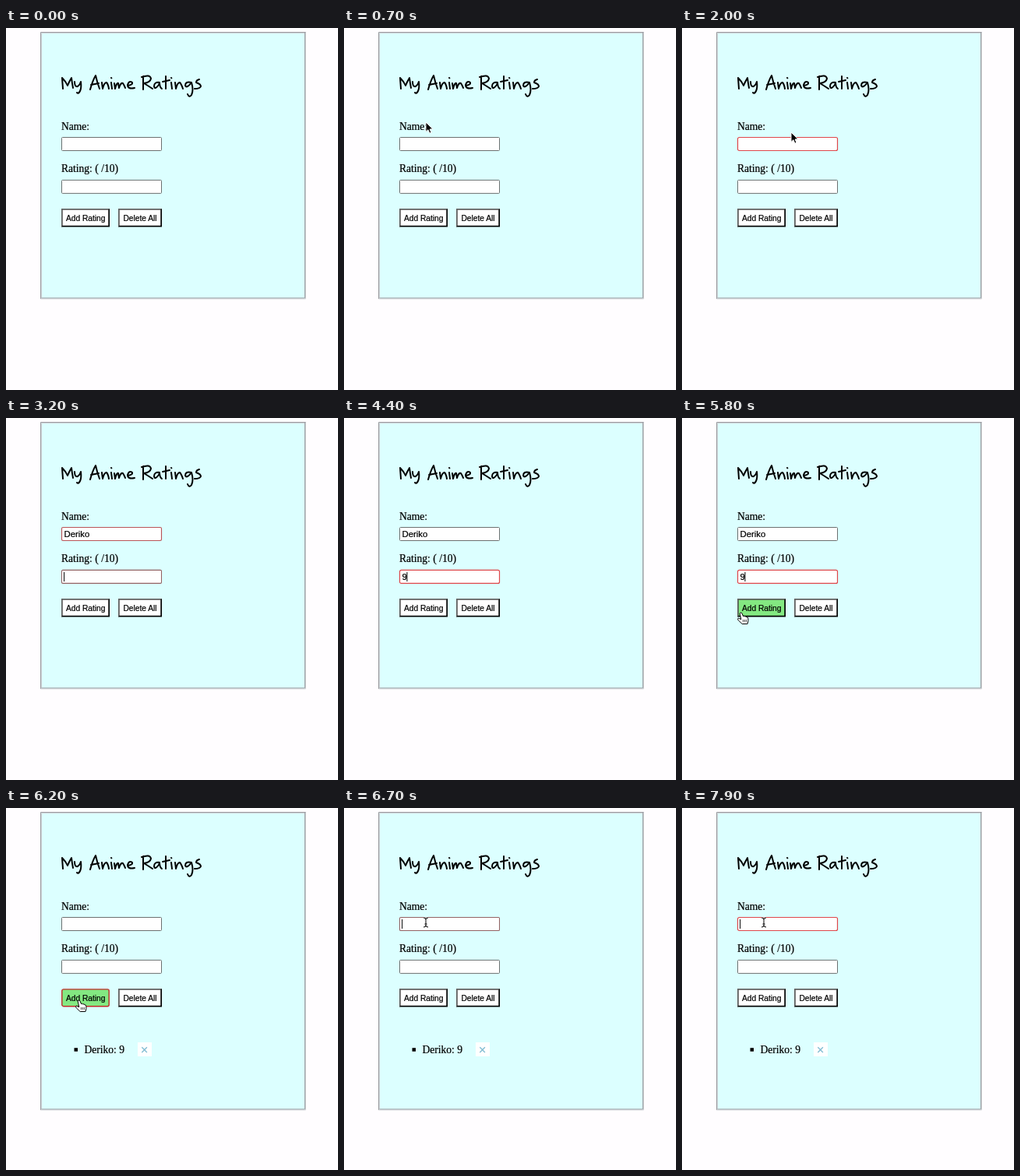
Write an HTML page that moves like this. It is 426 px wide and 465 px high and loops after 8 s.

```html
<!DOCTYPE html>
<html lang="en">
<head>
<meta charset="utf-8">
<title>My Anime Ratings</title>
<style>
  html, body { margin: 0; width: 100%; height: 100%; overflow: hidden; background: #fffdff; }
  svg { display: block; }
  text { font: 13.55px "Liberation Serif", serif; white-space: pre; stroke: #000; stroke-width: .22; }
  .field text { font: 11.33px "Liberation Sans", sans-serif; }
  .button text { font: 10.2px "Liberation Sans", sans-serif; }
  .title { fill: none; stroke: #000; stroke-width: 2; stroke-linecap: round; stroke-linejoin: round; }
</style>
</head>
<body>
<svg width="426" height="465" viewBox="0 0 426 465">
  <rect x="45" y="6" width="339" height="341" fill="#dcffff" id="card"/>
  <g fill="none">
    <path id="light" stroke="#cfd2d6"/>
    <path id="dark" stroke="#9b9da2"/>
  </g>
  <path class="title" role="img" aria-label="My Anime Ratings" d="
    M72 64L73 78M72 64Q77 69 79 74Q81 69 84 64Q85 72 86 77
    M88 69Q88 76 92 75Q95 73 96 69Q97 77 95 81Q93 85 91 83
    M108 79Q111 68 115 61Q117 70 120 78M109 73Q114 72 119 71
    M123 70L124 78Q126 70 129 70Q131 72 132 78
    M135 70L136 78M135 64l.4 .4
    M139 71L140 78Q142 70 144 71L145 77Q147 70 150 71Q152 74 153 77
    M156 74Q163 73 162 70Q158 67 156 73Q156 79 165 77
    M176 62L176 79M174 63Q185 59 186 65Q185 70 177 71Q182 74 188 78
    M197 70Q190 69 190 75Q191 80 196 73L197 70Q197 76 200 78
    M205 62L205 78M201 69L210 67
    M212 70L213 78M212 64l.4 .4
    M217 70L218 78Q220 70 223 70Q225 72 227 78
    M238 70Q230 68 230 74Q232 78 238 70Q241 80 238 86Q235 90 233 85
    M248 66Q244 67 244 70Q250 72 250 75Q249 78 242 78"/>
  <text x="71" y="130.5">Name:</text>
  <text x="71" y="185">Rating: ( /10)</text>
  <g id="name" class="field" transform="translate(71 140)">
    <rect x=".5" y=".5" width="128" height="17" fill="#fff"/>
    <text x="3.5" y="13"></text>
    <path d="M0 3v12" stroke="#000"/>
  </g>
  <g id="rating" class="field" transform="translate(71 195)">
    <rect x=".5" y=".4" width="128" height="17" fill="#fff"/>
    <text x="3.5" y="13"></text>
    <path d="M0 3v12" stroke="#000"/>
  </g>
  <g id="add" class="button" transform="translate(71 232)">
    <g class="bevel">
      <path d="M0 0H62V23.5H0z"/>
      <path d="M0 0H62L60.3 1.7H1.7V21.8L0 23.5z" fill="#636363"/>
    </g>
    <rect class="face" x="1.7" y="1.7" width="58.6" height="20.1"/>
    <rect class="ring" x=".8" y=".9" width="60.4" height="21.8" rx="2" stroke="#c22a28" stroke-width="1.4"/>
    <text x="6" y="15.5">Add Rating</text>
  </g>
  <g class="button" transform="translate(144 232)">
    <path d="M0 0H56V23.5H0z"/>
    <path d="M0 0H56L54.3 1.7H1.7V21.8L0 23.5z" fill="#636363"/>
    <rect x="1.7" y="1.7" width="52.6" height="20.1" fill="#fff"/>
    <text x="6.5" y="15.5">Delete All</text>
  </g>
  <g id="item">
    <rect x="87.5" y="308.2" width="4.5" height="4.5"/>
    <text x="100.5" y="314.5">Deriko: 9</text>
    <rect x="169" y="301" width="18" height="18" fill="#fff"/>
    <path d="M174.3 307.3l6.6 6.6m0-6.6l-6.6 6.6" stroke="#83bdd3" stroke-width="1.4"/>
  </g>
  <g id="pointer">
    <path class="arrow" d="M0 0V12.4L2.9 9.7 4.9 14.2 7 13.3 5.1 9 9 8.8z" stroke="#fff"/>
    <g class="beam" fill="none">
      <path d="M-3-6Q0-6 0-4Q0-6 3-6M0-5V5M-3 6Q0 6 0 4Q0 6 3 6M-1.5 2h3" stroke="#fff" stroke-width="2.4" opacity=".6"/>
      <path d="M-3-6Q0-6 0-4Q0-6 3-6M0-5V5M-3 6Q0 6 0 4Q0 6 3 6M-1.5 2h3" stroke="#000"/>
    </g>
    <g class="hand" stroke="#000" stroke-linejoin="round">
      <path d="M-1.8 1.2Q-1-1 .8 .6L2.6 4.8Q3.6 3.6 4.8 5Q6 4.2 7 5.8Q8.6 5.6 8.9 7.6Q9.3 10.5 8 14.5H1.2L-3.6 10Q-5.6 7.2-3.2 7.2L-.2 8.8z" fill="#fff"/>
      <path d="M2.4 9v3M4.4 9v3M6.4 9v3" stroke-width=".7"/>
    </g>
  </g>
</svg>
<script>
const LOOP = 8000, STEP = 100;
const $ = selector => document.querySelector(selector);
const show = (selector, on) => $(selector).style.display = on ? "" : "none";
const clamp = v => Math.max(0, Math.min(1, v));
const mix = (a, b, k) => a + (b - a) * k;

// Pointer routes as [time, x, y]
const visits = [
  { until: 2200, route: [[200, 222, 217], [300, 208, 150], [400, 182, 92], [500, 148, 67], [600, 121, 97],
    [700, 105, 121], [900, 101, 141], [1000, 101, 147], [1200, 104, 147], [1500, 140, 134]] },
  { until: LOOP, route: [[5300, 140, 137], [5500, 112, 190], [5600, 87, 226], [5700, 71, 254], [5800, 76, 250],
    [6000, 90, 249], [6100, 94, 247], [6300, 94, 247], [6500, 102, 198], [6600, 105, 163], [6700, 105, 147]] }
];
const keyTimes = [2200, 2400, 2700, 2800, 2900, 3000];
const caretResets = [1200, ...keyTimes, 3200, 3400, 4400, 6700];
const submitted = 6200;

function pointerAt(t) {
  const visit = visits.find(v => t >= v.route[0][0] && t < v.until);
  if (!visit) return null;
  const { route } = visit;
  const next = route.findIndex(p => p[0] > t);
  if (next < 0) return route[route.length - 1].slice(1);
  const a = route[next - 1], b = route[next], k = (t - a[0]) / (b[0] - a[0]);
  return [mix(a[1], b[1], k), mix(a[2], b[2], k)];
}

// Card with a grooved border
function drawCard(height) {
  const right = 385, bottom = 5 + height;
  $("#card").setAttribute("height", height - 2);
  const corner = (x, y, w, h) => `M${x} ${y + h}V${y}H${x + w}`;
  const opposite = (x, y, w, h) => `M${x} ${y}V${y + h}H${x - w}`;
  $("#dark").setAttribute("d", corner(44.5, 5.5, 340, height - 1) + opposite(right - 1.5, 6, 338, height - 2.5));
  $("#light").setAttribute("d", corner(45.5, 6.5, 338, height - 3) + opposite(right - .5, 5, 340, bottom - 5.5));
}

function drawField(id, value, spans, t) {
  const box = $(`#${id} rect`), text = $(`#${id} text`);
  const ramp = start => clamp((t - start + 100) / 300);
  const glow = spans.reduce((sum, [a, b]) => sum + ramp(a) - ramp(b), 0);
  box.setAttribute("stroke", `rgb(${mix(108, 222, glow)},${mix(112, 70, glow)},${mix(112, 74, glow)})`);
  box.setAttribute("stroke-width", mix(1, 1.2, glow));
  box.setAttribute("rx", mix(1, 2, glow));
  text.textContent = value;
  const width = value ? text.getComputedTextLength() : 0;
  $(`#${id} path`).setAttribute("transform", `translate(${3.6 + width} 0)`);
  const reset = caretResets.filter(r => r <= t).pop();
  show(`#${id} path`, spans.some(([a, b]) => t >= a && t < b) && (t - reset) % 1000 < 500);
}

function drawPointer(t) {
  const at = pointerAt(t);
  show("#pointer", at);
  if (!at) return false;
  const [x, y] = at;
  const over = (left, top, right, bottom) => x >= left && x <= right && y >= top && y <= bottom;
  const onAdd = over(71, 232, 133, 256);
  const onButton = onAdd || over(144, 232, 200, 256);
  const onField = over(71, 140, 200, 158) || over(71, 195, 200, 213);
  $("#pointer").setAttribute("transform", `translate(${x} ${y})`);
  show(".hand", onButton);
  show(".beam", onField);
  show(".arrow", !onButton && !onField);
  return onAdd;
}

function draw(t) {
  const sent = t >= submitted;
  const typed = keyTimes.filter(k => k <= t).length;
  drawCard(sent ? 383.4 : 343.4);
  drawField("name", sent ? "" : "Deriko".slice(0, typed), [[1200, 3200], [6700, LOOP + 500]], t);
  drawField("rating", t >= 4400 && !sent ? "9" : "", [[3200, 6000]], t);

  const hover = drawPointer(t), pressed = t >= 6000 && t < 6700;
  const face = hover ? "#83e881" : "#fff";
  $(".face").setAttribute("fill", face);
  $(".ring").setAttribute("fill", face);
  show(".ring", pressed);
  show(".bevel", !pressed);
  show(".face", !pressed);
  show("#item", sent);
}

const start = performance.now();
function tick() {
  const t = (performance.now() - start) % LOOP;
  draw(Math.floor(t / STEP) * STEP);
  requestAnimationFrame(tick);
}
tick();
</script>
</body>
</html>
```
